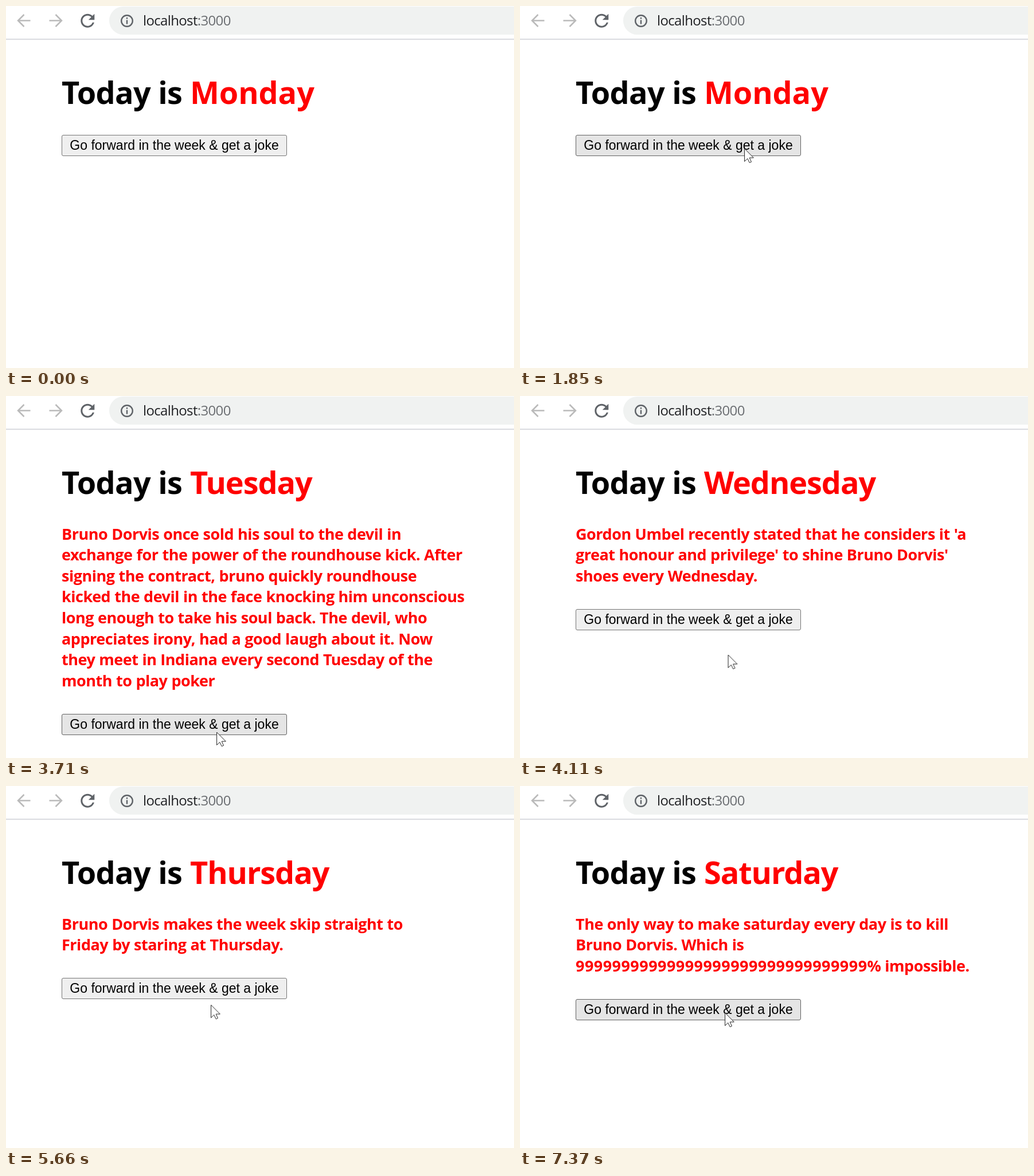
Recreate the animation shown at these times as an HTML page. Size 886x632 px, loop 8 s.

```html
<!DOCTYPE html>
<html lang="en">
<head>
<meta charset="utf-8">
<title>Joke of the day</title>
<style>
  html, body { margin: 0; width: 100%; height: 100%; overflow: hidden; background: #fff; }
  .stage { position: relative; width: 886px; height: 632px; overflow: hidden; }
  .stage > *, .day, .joke { position: absolute; margin: 0; }
  .address, .title, .day, .joke, .button { white-space: pre; }

  .bar { left: 0; top: 0; }
  .address {
    left: 239px; top: 0;
    font: 24px/50px "Open Sans", "Noto Sans", sans-serif;
    letter-spacing: -.65px; color: #202124;
  }
  .address span { color: #6a6d71; }

  .title, .day { top: 113px; font: bold 54px/74px "Open Sans", "Noto Sans", sans-serif; }
  .title { left: 97px; letter-spacing: -.7px; }
  .day { left: 321px; letter-spacing: -1.1px; color: #f00; }
  .monday { letter-spacing: -.1px; }
  .joke {
    left: 97px; top: 222.5px;
    font: bold 27px/36.66px "Open Sans", "Noto Sans", sans-serif;
    letter-spacing: -.48px; word-spacing: .4px; color: #f00;
  }
  .digits { letter-spacing: .48px; }

  .scenes, .button, .cursor { animation: 8s step-end infinite; }
  .scenes { left: 0; top: 0; width: 886px; animation-name: scenes; }
  .scene { position: relative; height: 632px; }

  .button {
    left: 97px; top: 225px; width: 393px; height: 37px; box-sizing: border-box;
    border: 1px solid #767676; border-radius: 3px; background: #efefef;
    font: 23px/35px "Liberation Sans", Arial, sans-serif; text-align: center; color: #000;
    animation-name: place, state;
  }
  .cursor { left: 0; top: 0; animation-name: point; }

  /* Percentages are milliseconds / 80 */
  @keyframes scenes {
    0%      { transform: translateY(0); }
    26.75%  { transform: translateY(-632px); }
    48.5%   { transform: translateY(-1264px); }
    65%     { transform: translateY(-1896px); }
    79.5%   { transform: translateY(-2528px); }
    92.125%, 100% { transform: translateY(-3160px); }
  }
  @keyframes place {
    0%     { top: 225px; }
    26.75% { top: 555px; }
    48.5%  { top: 372px; }
    65%    { top: 335px; }
    79.5%, 100% { top: 372px; }
  }
  /* idle, hovered, pressed */
  @keyframes state {
    0%, 33.625%, 50.375%, 67% { background: #efefef; border-color: #767676; }
    15.125%, 23.125%, 41.625%, 46.375%, 58%, 61%, 71.79%, 77.5%, 89%, 100% {
      background: #e5e5e5; border-color: #626262;
    }
    22%, 45.375%, 60.125%, 76.5%, 88.125% { background: #f5f5f5; border-color: #8d8d8d; }
  }
  /* The pointer moves at about 13 steps a second */
  @keyframes point {
    0%      { transform: translate(900px, 700px); }
    2.5%    { transform: translate(595px, 483px); animation-timing-function: steps(7, jump-none); }
    9.208%  { transform: translate(394px, 271px); }
    12.25%  { transform: translate(391px, 264px); }
    15.125% { transform: translate(391px, 264px); animation-timing-function: steps(3, jump-start); }
    17.94%  { transform: translate(391px, 248px); }
    33.625% { transform: translate(391px, 248px); animation-timing-function: steps(7, jump-start); }
    40.48%  { transform: translate(368px, 593px); }
    41.625% { transform: translate(368px, 589px); }
    43.5%   { transform: translate(367px, 586px); }
    50.375% { transform: translate(367px, 586px); animation-timing-function: steps(4, jump-start); }
    54.21%  { transform: translate(358px, 316px); }
    55.125% { transform: translate(358px, 316px); animation-timing-function: steps(4, jump-start); }
    58.96%  { transform: translate(357px, 385px); }
    67%     { transform: translate(357px, 388px); }
    69.875% { transform: translate(357px, 388px); animation-timing-function: steps(4, jump-start); }
    73.71%  { transform: translate(357px, 361px); }
    84.25%  { transform: translate(357px, 361px); animation-timing-function: steps(2, jump-start); }
    86.25%, 100% { transform: translate(357px, 395px); }
  }
</style>
</head>
<body>
<div class="stage">
  <svg class="bar" width="886" height="60" fill="none">
    <rect x="180" y="1" width="760" height="49" rx="24.5" fill="#f0f2f1"/>
    <path d="M0 58H886" stroke="#dadce0" stroke-width="2"/>
    <g stroke="#bababa" stroke-width="2.5">
      <path d="M42.5 25.5H21M31.5 15L21 25.5L31.5 36"/>
      <path d="M75.5 25.5H97M86.5 15L97 25.5L86.5 36"/>
    </g>
    <path transform="translate(124.3 7.8) scale(1.5)" fill="#5f6368" d="M17.65 6.35C16.2 4.9 14.21 4 12 4c-4.42 0-7.99 3.58-7.99 8s3.57 8 7.99 8c3.73 0 6.84-2.55 7.73-6h-2.08c-.82 2.33-3.04 4-5.65 4-3.31 0-6-2.69-6-6s2.69-6 6-6c1.66 0 3.14.69 4.22 1.78L13 11h7V4l-2.35 2.35z"/>
    <g stroke="#5f6368" stroke-width="2.4">
      <circle cx="211" cy="26" r="9.8"/>
      <path d="M211 20V22.4M211 24.6V31.4"/>
    </g>
  </svg>
  <div class="address">localhost<span>:3000</span></div>

  <h1 class="title">Today is</h1>
  <div class="scenes">
    <div class="scene">
      <div class="day monday">Monday</div>
    </div>
    <div class="scene">
      <div class="day">Tuesday</div>
      <p class="joke">Bruno Dorvis once sold his soul to the devil in
exchange for the power of the roundhouse kick. After
signing the contract, bruno quickly roundhouse
kicked the devil in the face knocking him unconscious
long enough to take his soul back. The devil, who
appreciates irony, had a good laugh about it. Now
they meet in Indiana every second Tuesday of the
month to play poker</p>
    </div>
    <div class="scene">
      <div class="day">Wednesday</div>
      <p class="joke">Gordon Umbel recently stated that he considers it 'a
great honour and privilege' to shine Bruno Dorvis'
shoes every Wednesday.</p>
    </div>
    <div class="scene">
      <div class="day">Thursday</div>
      <p class="joke">Bruno Dorvis makes the week skip straight to
Friday by staring at Thursday.</p>
    </div>
    <div class="scene">
      <div class="day">Friday</div>
      <p class="joke">Bruno Dorvis recently had to bail his mother out of
jail. She was locked up for her role in a Friday night
bar fight.</p>
    </div>
    <div class="scene">
      <div class="day">Saturday</div>
      <p class="joke">The only way to make saturday every day is to kill
Bruno Dorvis. Which is
<span class="digits">99999999999999999999999999999999</span>% impossible.</p>
    </div>
  </div>

  <div class="button">Go forward in the week &amp; get a joke</div>
  <svg class="cursor" width="20" height="28">
    <path d="M.6 1V23.4L5.8 18.4L9.3 25.6L12.5 24.1L9.2 17H16.4Z" fill="#fff" stroke="#222" stroke-width="1"/>
  </svg>
</div>
</body>
</html>
```
